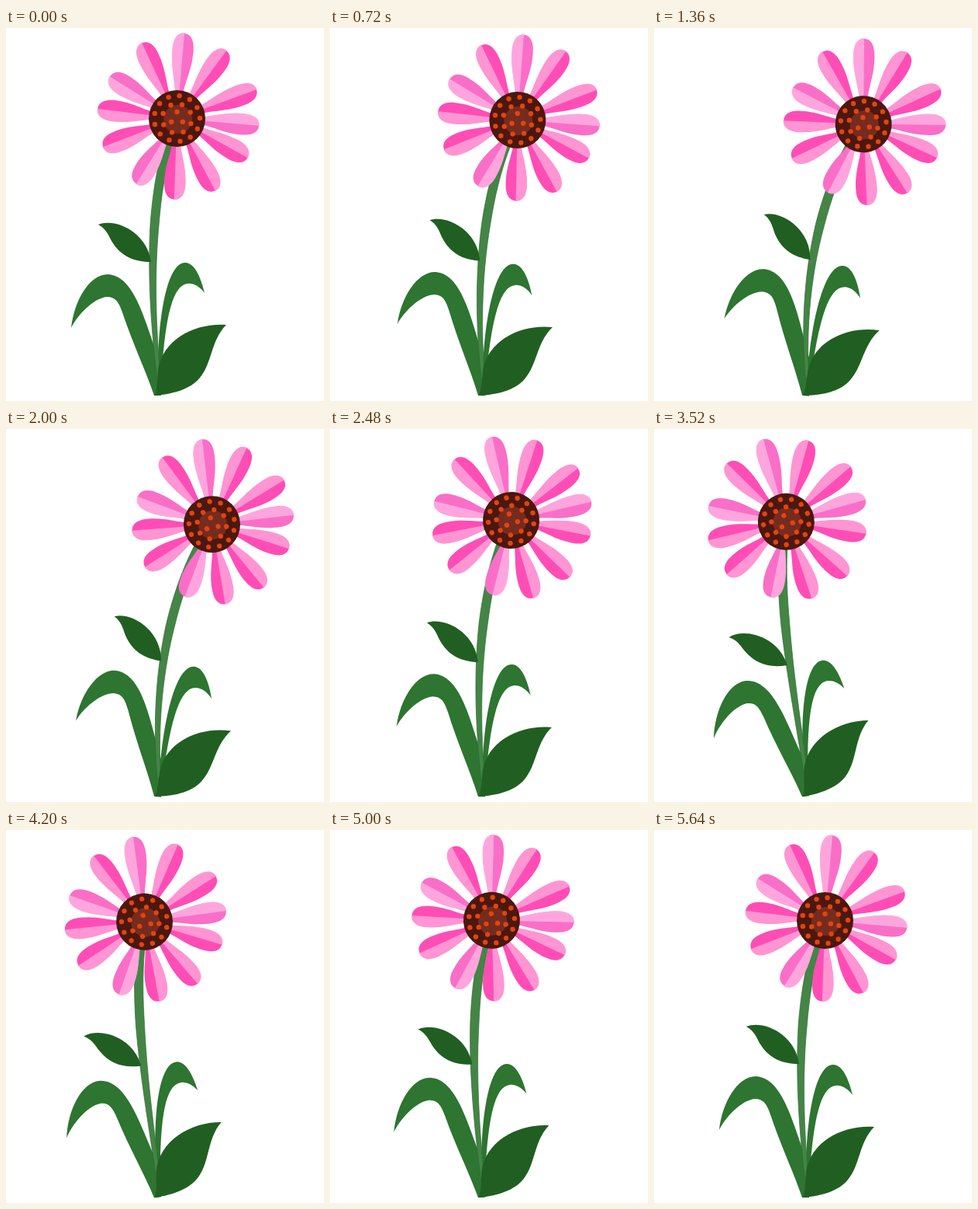
Animation of 410 by 480 pixels, one loop 5720 ms. Source, as an HTML page:

```html
<!DOCTYPE html>
<html lang="en">
<head>
<meta charset="utf-8">
<title>Swaying flower</title>
<style>
  html, body { margin: 0; width: 100%; height: 100%; overflow: hidden; background: #fff; }
  svg { display: block; width: 410px; height: 480px; }
</style>
</head>
<body>
<svg viewBox="0 0 410 480">
  <g id="blades" fill="#2d7530">
    <path d="M84 386C88 350 108 317 131 317C167 318 180 382 198 428L200 473H191C180 440 164 408 150 366C145 352 141 346 130 346C112 348 92 370 84 386Z"/>
    <path d="M196 440C196 375 207 302 231 302C244 302 252 324 256 341C249 332 241 328 234 329C215 331 206 371 201 440Z"/>
  </g>
  <path id="stem" fill="#448546" stroke="#2f6c34" stroke-width=".7"/>
  <path id="midLeaf" fill="#205f21" d="M119 253C140 244 182 262 187 301C165 301 148 294 136 274C131 264 128 258 119 253Z"/>
  <path id="baseLeaf" fill="#205f21" d="M192 473C195 465 195 455 196 440C202 400 245 379 284 382C264 402 266 431 250 450C238 465 215 471 192 473Z"/>
  <g id="head"></g>
</svg>
<script>
const LOOP = 5720, STEP = 40, LAST = 5640;
const $ = id => document.getElementById(id);
const head = $('head');

function add(tag, attrs) {
  const el = document.createElementNS('http://www.w3.org/2000/svg', tag);
  for (const key in attrs) el.setAttribute(key, attrs[key]);
  head.appendChild(el);
}

const dot = (x, y, r, fill) => add('circle', { cx: x, cy: y, r, fill });

// Petal direction in degrees clockwise from the top, and its length.
const petals = [
  [5, 110], [36, 108], [70, 109], [95, 106], [119, 104], [152, 105],
  [182, 104], [212, 99], [249, 102], [277, 103], [302, 102], [335, 107]
];

// Outline of one side of a petal, from its base to its tip.
function side(w, len) {
  return `M0 -28H${w * .3}C${w * .55} ${-len * .48} ${w} ${-len * .58} ${w} ${-len * .8}` +
    `C${w} ${-len * .93} ${w * .62} ${-len} 0 ${-len}`;
}

petals.forEach(([angle, len], i) => {
  const soft = [0, 3, 7, 10].includes(i);
  const transform = `rotate(${angle})`;
  const light = soft ? '#ffa5de' : '#ff95d3';
  const dark = soft ? '#f96fc8' : '#ff4db6';
  add('path', { d: side(-13.5, len) + 'L1 -28Z', fill: light, stroke: light, transform });
  add('path', { d: side(13.5, len) + 'L0 -28Z', fill: dark, transform });
});

dot(0, 0, 36.5, '#4b180f');
dot(1, 1, 18.5, '#752c1e');
for (const [count, radius, start] of [[13, 29.5, 6], [8, 19, 20], [3, 8.5, 0]]) {
  for (let i = 0; i < count; i++) {
    const a = (start + i * 360 / count) * Math.PI / 180;
    dot(radius * Math.sin(a), -radius * Math.cos(a), 3.2, '#e5430f');
  }
}

// Smooth interpolation through [time, value] keys.
function ease(keys, t) {
  let i = 1;
  while (i < keys.length - 1 && t > keys[i][0]) i++;
  const [t0, v0] = keys[i - 1], [t1, v1] = keys[i];
  const p = Math.min(1, (t - t0) / (t1 - t0));
  return v0 + (v1 - v0) * (1 - Math.cos(Math.PI * p)) / 2;
}

const swayKeys = [[0, 0], [1640, 1], [3640, -1], [LAST, 0]];
const twistKeys = [[0, 0], [2000, -24.5], [4200, 0], [LAST, 0]];

const bezier = (a, b, c, d, t) => {
  const u = 1 - t;
  return u * u * u * a + 3 * u * u * t * b + 3 * u * t * t * c + t * t * t * d;
};

function stemPath(shift, drop) {
  const left = [], right = [], n = 24;
  const point = t => {
    const x = bezier(197, 184, 186, 214, t), y = bezier(450, 330, 215, 133, t);
    const h = (473 - y) / 357;
    return [x + shift * h ** 1.7, y + drop * h * h];
  };
  for (let i = 0; i <= n; i++) {
    const t = i / n;
    const [x, y] = point(t), [ax, ay] = point(t - .01), [bx, by] = point(t + .01);
    const len = Math.hypot(bx - ax, by - ay);
    const w = 2.2 + 3.4 * Math.min(1, t * 1.7);
    const nx = (by - ay) / len * w, ny = (ax - bx) / len * w;
    left.push(`${(x + nx).toFixed(2)} ${(y + ny).toFixed(2)}`);
    right.unshift(`${(x - nx).toFixed(2)} ${(y - ny).toFixed(2)}`);
  }
  return `M${left.concat(right).join('L')}Z`;
}

function draw(time) {
  const t = Math.min(LAST, Math.floor(time / STEP) * STEP);
  const sway = ease(swayKeys, t);
  const shift = 52.2 * sway + 1.2 * sway * sway;
  const drop = 2.6 * sway + 5.6 * sway * sway;
  const place = (id, value) => $(id).setAttribute('transform', value);
  place('blades', `translate(193 473) matrix(1 ${.115 * sway} ${-.082 * sway} 1 0 0) translate(-193 -473)`);
  place('baseLeaf', `rotate(${4.7 * sway} 193 473)`);
  place('midLeaf', `translate(${15.5 * sway} ${-3 * sway}) rotate(${9.8 * sway} 187 301)`);
  place('head', `translate(${220.5 + shift} ${116.5 + drop}) rotate(${15.4 * sway + ease(twistKeys, t)})`);
  $('stem').setAttribute('d', stemPath(shift, drop));
}

const begin = performance.now();
function tick() {
  draw((performance.now() - begin) % LOOP);
  requestAnimationFrame(tick);
}
tick();
</script>
</body>
</html>
```
